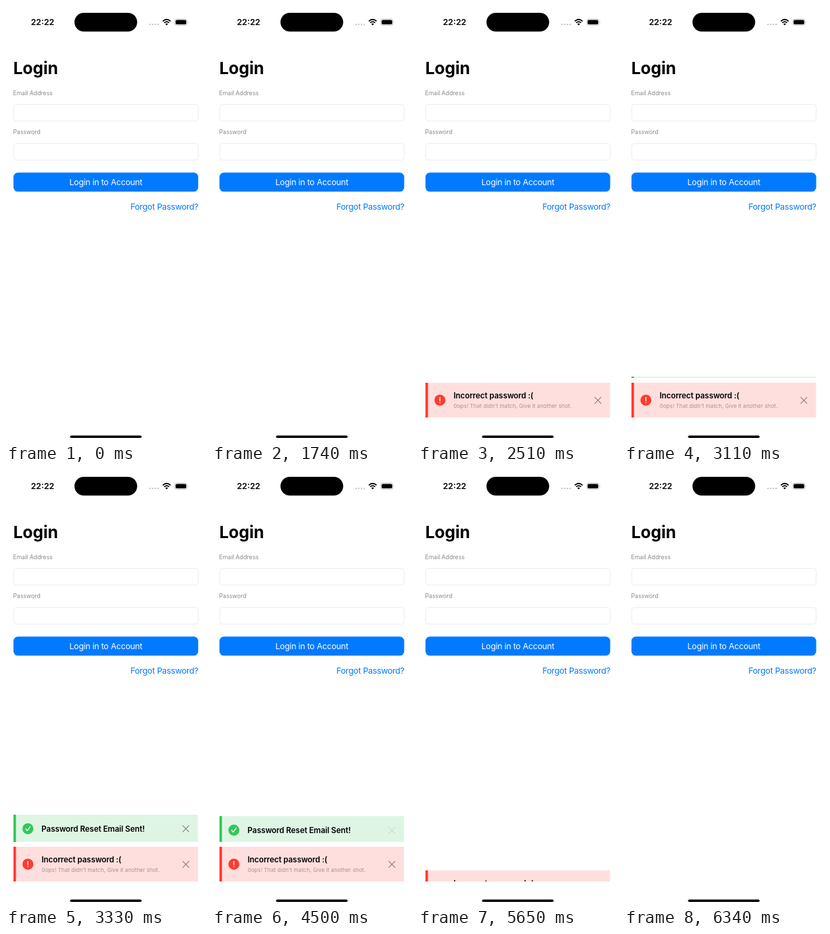
An HTML page that plays this animation: 295x640 px, repeating every 7020 ms.

```html
<!DOCTYPE html>
<html lang="en">
<head>
<meta charset="utf-8">
<title>Login</title>
<style>
  html, body { margin: 0; width: 100%; height: 100%; overflow: hidden; background: #fff; }
  svg { display: block; width: 295px; height: 640px; font-family: Inter, Roboto, sans-serif; }
  .title { font-size: 24.6px; font-weight: 700; letter-spacing: -.15px; }
  .clock { font-size: 12.3px; font-weight: 600; text-anchor: middle; }
  .label { font-size: 8.7px; fill: #8a8a8e; }
  .action { font-size: 12.3px; letter-spacing: -.25px; }
  .head { font-size: 11.6px; font-weight: 600; letter-spacing: -.1px; }
  .note { font-size: 8px; letter-spacing: .08px; fill: #a39393; }
  .field { fill: #fff; stroke: #e8e8e8; stroke-width: .8; }
  .close { stroke: #857f7f; stroke-width: 1.1; stroke-linecap: round; }
  .mark { fill: none; stroke: #fff; stroke-width: 1.5; stroke-linecap: round; stroke-linejoin: round; }
</style>
</head>
<body>
<svg viewBox="0 0 295 640">
  <defs>
    <clipPath id="redClip"><rect x="11" y="553" width="272.5" height="51"/></clipPath>
    <clipPath id="greenClip"><rect x="11" y="506" width="272.5" height="40"/></clipPath>
  </defs>
  <rect width="295" height="640" fill="#fff"/>

  <text class="clock" x="54" y="28">22:22</text>
  <rect x="101" y="10" width="92.5" height="27.5" rx="13.75"/>
  <g fill="#b8b8b8">
    <circle cx="212.5" cy="27" r="1.1"/><circle cx="216.5" cy="27" r="1.1"/>
    <circle cx="220.5" cy="27" r="1.1"/><circle cx="224.5" cy="27" r="1.1"/>
  </g>
  <g fill="none" stroke="#000" stroke-width="1.7">
    <path d="M231.3 22.3Q237 17.2 242.7 22.3"/>
    <path d="M233.4 24.7Q237 21.5 240.6 24.7"/>
  </g>
  <path d="M235 26.3Q237 24.7 239 26.3L237 28.4Z"/>
  <rect x="248.9" y="19.2" width="18.2" height="9.2" rx="2.9" fill="#fff" stroke="#b0b0b0" stroke-width=".8"/>
  <rect x="250.2" y="20.5" width="15.6" height="6.6" rx="1.8"/>
  <path d="M268.2 22.3Q269.4 23.8 268.2 25.3Z" fill="#b0b0b0"/>

  <text class="title" x="10.8" y="100">Login</text>
  <text class="label" x="10.5" y="130.7">Email Address</text>
  <rect class="field" x="11.4" y="144.4" width="272" height="24.4" rx="4"/>
  <text class="label" x="10.5" y="188.2">Password</text>
  <rect class="field" x="11.4" y="201.8" width="272" height="24.4" rx="4"/>
  <rect x="11" y="244.6" width="272.5" height="28" rx="6.5" fill="#007aff"/>
  <text class="action" x="147.3" y="263.2" text-anchor="middle" fill="#fff">Login in to Account</text>
  <text class="action" x="283.6" y="299.3" text-anchor="end" fill="#007aff">Forgot Password?</text>

  <g clip-path="url(#redClip)">
    <g id="red">
      <rect x="11" y="553" width="272.5" height="51" fill="#ffdfdd"/>
      <rect x="11" y="553" width="3.7" height="51" fill="#ff3b30"/>
      <circle cx="32.3" cy="578.6" r="8.1" fill="#ff3b30"/>
      <path class="mark" d="M32.3 574.8V579.2M32.3 582.1V582.2"/>
      <text class="head" x="52.5" y="576.3">Incorrect password :(</text>
      <text class="note" x="52.6" y="590.3">0ops! That didn't match, Give it another shot.</text>
      <path class="close" d="M260.8 574.3l9 9m0-9l-9 9"/>
    </g>
  </g>
  <g clip-path="url(#greenClip)">
    <g id="green">
      <rect x="11" y="506" width="272.5" height="40" fill="#dff5e4"/>
      <rect x="11" y="506" width="3.7" height="40" fill="#34c759"/>
      <circle cx="32.3" cy="526.6" r="8.1" fill="#34c759"/>
      <path class="mark" style="stroke-width:1.3" d="M29.1 527l2.3 2.6 4.1-5.9"/>
      <text class="head" x="52.3" y="531">Password Reset Email Sent!</text>
      <path class="close" d="M260.8 522.2l9 9m0-9l-9 9"/>
    </g>
  </g>

  <rect x="94.5" y="630.4" width="105.5" height="3.6" rx="1.8"/>
</svg>
<script>
const LOOP = 7020, SLIDE = 250, STEP = 110;

// begin/press open a burst of screen updates; enter/leave start the slides
const toasts = [
  { id: 'red', height: 51, begin: 1740, enter: 1800, press: 5420, leave: 5490 },
  { id: 'green', height: 40, begin: 3000, enter: 3070, press: 4390, leave: 4460 }
].map(toast => {
  const el = document.getElementById(toast.id);
  return { ...toast, el, close: el.querySelector('.close') };
});

const ease = p => {
  p = Math.min(1, Math.max(0, p));
  return p < .5 ? 2 * p * p : 1 - 2 * (1 - p) ** 2;
};

// The screen refreshes in coarse steps within each burst.
const snap = (t, from) => from + Math.floor((t - from) / STEP) * STEP;

function draw(t) {
  for (const { el, close, height, begin, enter, press, leave } of toasts) {
    const pressed = t >= press;
    const at = snap(t, pressed ? press : begin);
    const shown = pressed ? 1 - ease((at - leave) / SLIDE) : ease((at - enter) / SLIDE);
    el.setAttribute('transform', `translate(0 ${(1 - shown) * height})`);
    el.style.display = shown > 0 ? '' : 'none';
    close.style.opacity = pressed ? .2 : 1;
  }
}

const start = performance.now();
function tick() {
  draw((performance.now() - start) % LOOP);
  requestAnimationFrame(tick);
}
draw(0);
requestAnimationFrame(tick);
</script>
</body>
</html>
```
